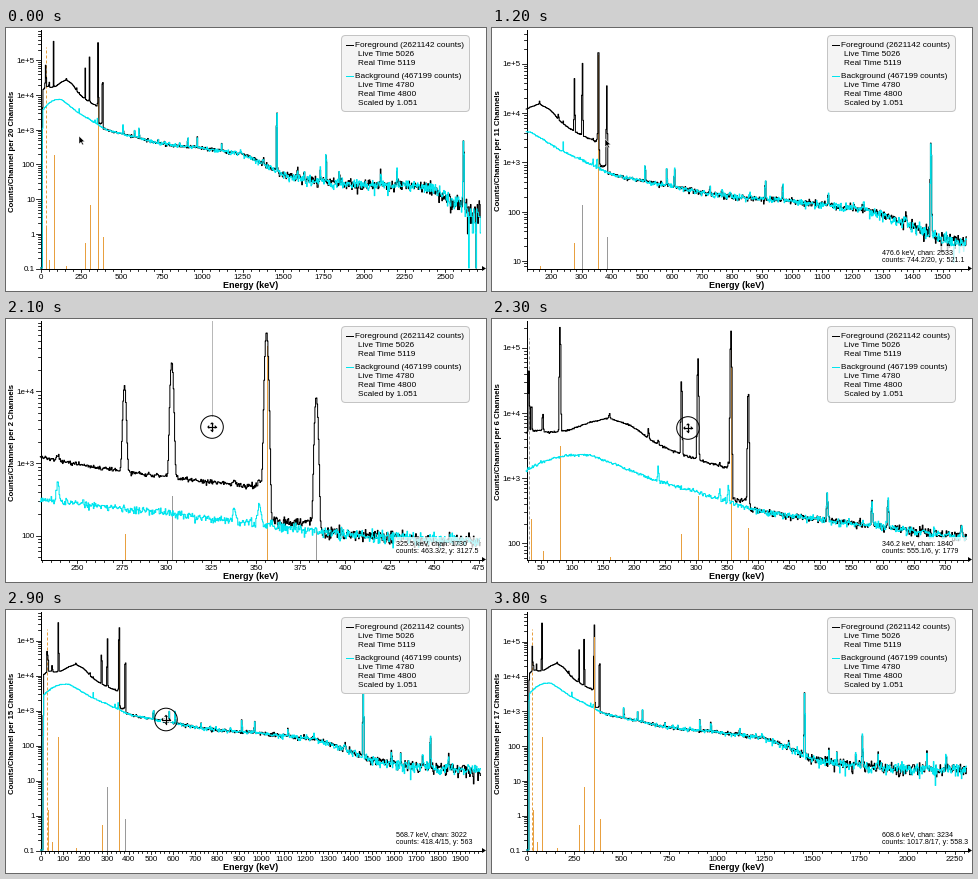
A matplotlib script that plays this animation: 480 by 263 pixels, repeating every 4300 ms.

```python
import numpy as np
import matplotlib.pyplot as plt
from matplotlib.animation import FuncAnimation
from matplotlib.patches import Circle, FancyBboxPatch, Polygon, Rectangle

W, H, DPI = 480, 263, 100
LEFT, RIGHT, TOP, BOTTOM = 34, 474, 2, 240
STEP_MS, FRAMES = 100, 43
KEV = 0.18816  # energy width of one channel
PT = 72 / DPI
CYAN, ORANGE, GREY = "#00e5ee", "#e8a040", "#9a9a9a"

plt.rcParams["font.family"] = "Liberation Sans"

# time, low keV, high keV, log10 of the lower and upper count limits
VIEWS = np.array([
    (0, 0, 2719, -1, 5.865), (900, 0, 2719, -1, 5.865),
    (1000, 39, 2338, .6, 5.82), (1100, 78, 1957, .7, 5.74),
    (1200, 117, 1579, .85, 5.67), (1300, 156, 1190, 1.5, 5.48),
    (1400, 194.4, 812.6, 1.68, 5.305), (1500, 229.3, 475.9, 1.667, 4.97),
    (2100, 229.3, 475.9, 1.667, 4.97), (2200, 128, 600, 1.75, 5.2),
    (2300, 27, 735, 1.75, 5.4), (2400, 0, 870, -1, 5.63),
    (2500, 0, 1047.6, -1, 5.674), (2900, 0, 1991, -1, 5.8),
    (3300, 0, 2225, -1, 5.825), (3800, 0, 2311, -1, 5.833)])

# time, pointer x, pointer y
POINTER = np.array([
    (0, 73, 108), (400, 73, 108), (500, 74, 110), (800, 104, 110),
    (900, 113, 111), (1500, 113, 111), (2000, 206, 108), (2100, 206, 108),
    (2500, 186, 110), (2900, 160, 109.5), (3300, 153, 110), (3800, 150, 110)])

# time, energy, channel, counts, y value of the readout
READOUT = np.array([
    (400, 229.3, 1218, 13020.4, 590.2), (500, 229.3, 1218, 13020.4, 564.1),
    (800, 399.1, 2121, 997.9, 564.1), (900, 476.6, 2533, 744.2, 521.1),
    (1500, 476.6, 2533, 744.2, 521.1), (1600, 284, 1509, 702.1, 3010.2),
    (2100, 325.5, 1730, 463.3, 3127.5), (2500, 366.9, 1951, 646.9, 430.6),
    (2900, 568.7, 3022, 418.4, 563), (3800, 608.6, 3234, 1017.8, 558.3)])

# counts per channel of the smooth continuum
BACK_SHAPE = np.array([
    (14, 184), (50, 290), (90, 370), (130, 375), (194, 218), (229, 160),
    (300, 102), (325, 86), (400, 52), (500, 38), (600, 30), (700, 22),
    (800, 18), (1000, 15), (1250, 10), (1400, 4.7), (1450, 3.4), (1500, 2.4),
    (1700, 1.7), (2000, 1.25), (2300, 1.25), (2400, 1.1), (2450, .8),
    (2500, .6), (2550, .4), (2620, .38), (2640, .22), (2730, .17)])
FORE_SHAPE = np.array([
    (14, 700), (25, 800), (45, 900), (65, 830), (95, 900), (130, 1200),
    (160, 1380), (195, 1060), (229, 620), (260, 440), (290, 345), (320, 290),
    (354, 232), (358, 82), (381, 74), (386, 55), (400, 52)])
BACK_PEAKS = [
    (239, 1100), (295, 150), (338, 340), (352, 650), (511, 750), (583, 550),
    (609, 620), (727, 130), (768, 80), (795, 80), (860, 90), (911, 420),
    (969, 320), (1120, 200), (1238, 70), (1378, 50), (1460.8, 4200),
    (1588, 50), (1630, 40), (1730, 60), (1764.5, 260), (1847, 40),
    (2103, 60), (2204, 70), (2614.5, 680)]
FORE_PEAKS = [
    (30.9, 6.2e4), (35, 1.5e4), (53.2, 8e3), (81, 3.4e5), (160.6, 2.5e3),
    (223.2, 3e3), (276.4, 5.3e4), (302.9, 1.2e5), (356, 3.3e5), (383.9, 4.2e4)]

# reference lines: energy and relative amplitude
REF_LINES = [
    (30.95, 1), (35, .18), (53.16, .034), (81, .51), (160.6, .01),
    (276.4, .111), (302.85, .284), (356.017, .962), (383.85, .139)]

LEGEND = [
    (349, 19, "Foreground (2621142 counts)"), (352, 28, "Live Time 5026"),
    (352, 37, "Real Time 5119"), (349, 50, "Background (467199 counts)"),
    (352, 59, "Live Time 4780"), (352, 68, "Real Time 4800"),
    (352, 77, "Scaled by 1.051")]


def at(table, t):
    return [np.interp(t, table[:, 0], col) for col in table[:, 1:].T]


def build_spectra():
    rng = np.random.default_rng(7)
    energy = (np.arange(14480) + .5) * KEV

    def shape(points):
        return np.exp(np.interp(energy, points[:, 0], np.log(points[:, 1])))

    def peaks(lines):
        total = np.zeros_like(energy)
        for e, area in lines:
            sigma = .6 + .0004 * e
            total += (area * KEV / (sigma * 2.5066)
                      * np.exp(-.5 * ((energy - e) / sigma) ** 2))
        return total

    common = peaks(BACK_PEAKS)
    back_mean = shape(BACK_SHAPE)
    fore_mean = np.where(energy < 400, shape(FORE_SHAPE), back_mean)
    fore = rng.poisson(fore_mean + common + peaks(FORE_PEAKS)).astype(float)
    back = rng.poisson((back_mean + common) / 1.051) * 1.051
    for data in (fore, back):
        data[energy < 14] = 0
        data[14300:14320] = 0
    return fore, back


FORE, BACK = build_spectra()

fig = plt.figure(figsize=(W / DPI, H / DPI), dpi=DPI, facecolor="white")
ax = fig.add_axes([0, 0, 1, 1])


def text(x, y, s, size=8, **kw):
    return ax.text(x, y, s, fontsize=size * PT, **kw)


def line(xs, ys, color="black", width=1, **kw):
    return ax.plot(xs, ys, color=color, lw=width * PT, **kw)


class View:
    def __init__(self, t):
        self.lo, self.hi, self.bottom, self.top = at(VIEWS, t)
        self.width = self.hi - self.lo
        self.bin = int(np.ceil(self.width / KEV / 725))

    def x(self, energy):
        return LEFT + .5 + (energy - self.lo) / self.width * (RIGHT - LEFT)

    def y(self, log_counts):
        frac = (log_counts - self.bottom) / (self.top - self.bottom)
        return BOTTOM + .5 - frac * (BOTTOM - TOP)


def draw_axes(v):
    line([LEFT + .5] * 2, [TOP, BOTTOM + .5])
    line([LEFT + .5, RIGHT + 3], [BOTTOM + .5] * 2)
    ax.add_patch(Polygon([(476, 238), (476, 243), (480, 240.5)], fc="black", lw=0))

    step = next(s for s in (10, 25, 50, 100, 250) if v.width / s <= 20)
    minor = step / 5
    for i in range(int(np.ceil(v.lo / minor)), int(v.hi / minor) + 1):
        x, major = v.x(i * minor), i % 5 == 0
        line([x, x], [BOTTOM + .5, BOTTOM + (4 if major else 2.5)], width=.8)
        if major:
            text(x, 251, f"{i * step // 5}", ha="center")

    for d in range(int(np.floor(v.bottom)), int(v.top) + 1):
        for m in range(1, 10):
            log_counts = d + np.log10(m)
            if not v.bottom <= log_counts <= v.top:
                continue
            y = v.y(log_counts)
            line([LEFT - (4 if m == 1 else 2), LEFT + .5], [y, y], width=.8)
            if m == 1:
                label = f"1e+{d}" if d > 2 else f"{10.0 ** d:g}"
                text(29, y + 2.8, label, ha="right")

    text(245, 260, "Energy (keV)", 9, ha="center", weight="bold")
    text(6.5, 123, f"Counts/Channel per {v.bin} Channels", 7.8, rotation=90,
         ha="center", va="center", weight="bold")


def draw_spectrum(v, data, color, z):
    k = v.bin
    first, last = int(v.lo / KEV / k), int(np.ceil(v.hi / KEV / k))
    last = min(last, len(data) // k)
    counts = data[first * k:last * k].reshape(-1, k).sum(axis=1)
    edges = v.x(np.arange(first, last + 1) * k * KEV)
    xs = np.clip(np.repeat(edges, 2)[1:-1], LEFT, RIGHT + .5)
    ys = v.y(np.log10(np.maximum(counts, .1)))
    line(xs, np.repeat(np.clip(ys, TOP, BOTTOM), 2), color, zorder=z)


def draw_ref_lines(v, t, pointer_x):
    zoomed = 1000 <= t <= 2100 or 2600 <= t < 3300
    for e, amp in REF_LINES:
        if not v.lo < e < v.hi:
            continue
        x, dashed = v.x(e), e < 32
        grey = (zoomed and e in (302.85, 383.85)) or (dashed and 2200 <= t < 2900)
        near = e > 350 and 2200 <= t < 3300 and abs(x - pointer_x) < 6
        line([x, x], [BOTTOM, BOTTOM - 221 * amp], GREY if grey else ORANGE,
             1.6 if near else 1, ls=(0, (3, 2)) if dashed else "-",
             zorder=6 if e > 350 and t >= 3300 else 2.5)
        if near:
            text(199, 11, "Ba133, 356.017 keV, rel. amp. 0.962", color=ORANGE)
            text(199, 19, "Ba133 to Cs133 via Electron Capture", color=ORANGE)


def draw_legend():
    ax.add_patch(FancyBboxPatch(
        (339, 11), 121, 69, boxstyle="round,pad=3.5,rounding_size=4",
        fc="#f4f4f4", ec="#c4c4c4", lw=PT, zorder=7))
    for x, y, s in LEGEND:
        text(x, y, s, 8.3, zorder=8)
    line([340, 347], [16.5, 16.5], zorder=8)
    line([340, 347], [47.5, 47.5], CYAN, zorder=8)


def draw_readout(v, t):
    energy, chan, counts, y = at(READOUT, t)
    k = 20 if t <= 1500 else v.bin
    ax.add_patch(Rectangle((388, 218), 87, 18, fc="white", alpha=.75, lw=0, zorder=7))
    text(390, 226, f"{energy:.1f} keV, chan: {chan:.0f}", 7.1, zorder=8)
    text(390, 234, f"counts: {round(counts, 1):g}/{k}, y: {round(y, 1):g}", 7.1,
         zorder=8)


def draw_arrow(x, y):
    shape = [(0, 0), (0, 8), (2, 6.3), (3.3, 9), (4.6, 8.5), (3.3, 5.8), (5.8, 5.6)]
    ax.add_patch(Polygon([(x + dx, y + dy) for dx, dy in shape], fc="black",
                         ec="white", lw=.5 * PT, zorder=9))


def draw_press(x, y):
    ax.add_patch(Circle((x, y), 11.3, fill=False, ec="black", lw=PT, zorder=9))
    for color, width in (("white", 3), ("black", 1.2)):
        line([x - 4, x + 4], [y, y], color, width, zorder=9)
        line([x, x], [y - 4, y + 4], color, width, zorder=9)
    for dx, dy in ((1, 0), (-1, 0), (0, 1), (0, -1)):
        tip = (x + 4.8 * dx, y + 4.8 * dy)
        base = (x + 2.8 * dx, y + 2.8 * dy)
        ax.add_patch(Polygon([tip, (base[0] + 2 * dy, base[1] + 2 * dx),
                              (base[0] - 2 * dy, base[1] - 2 * dx)],
                             fc="black", lw=0, zorder=10))


def draw_selection(v, t):
    start, end = v.x(229.3), v.x(at(READOUT, t)[0])
    ax.add_patch(Rectangle((start, TOP), end - start, BOTTOM - TOP,
                           fc="#cdcdcd", lw=0, zorder=1))
    if end - start > 4:
        text((start + end) / 2 - 4, 121, "Zoom In", 7, ha="center",
             weight="bold", zorder=8)


def draw(frame):
    t = frame * STEP_MS
    ax.clear()
    ax.set_xlim(0, W)
    ax.set_ylim(H, 0)
    ax.axis("off")
    v = View(t)
    px, py = at(POINTER, t)

    if 500 <= t <= 900:
        draw_selection(v, t)
    if t == 2100:
        line([px, px], [TOP, 97], "#b8b8b8", zorder=2)
    draw_ref_lines(v, t, px)
    draw_spectrum(v, FORE, "black", 3)
    draw_spectrum(v, BACK, CYAN, 4)
    draw_axes(v)
    draw_legend()
    if t >= 400:
        draw_readout(v, t)
    if 500 <= t <= 900 or 2100 <= t < 3800:
        draw_press(px, py)
    elif t < 3800:
        draw_arrow(px, py)
    return []


anim = FuncAnimation(fig, draw, frames=FRAMES, init_func=lambda: [],
                     interval=STEP_MS, repeat=True, repeat_delay=0)
plt.show()
```
